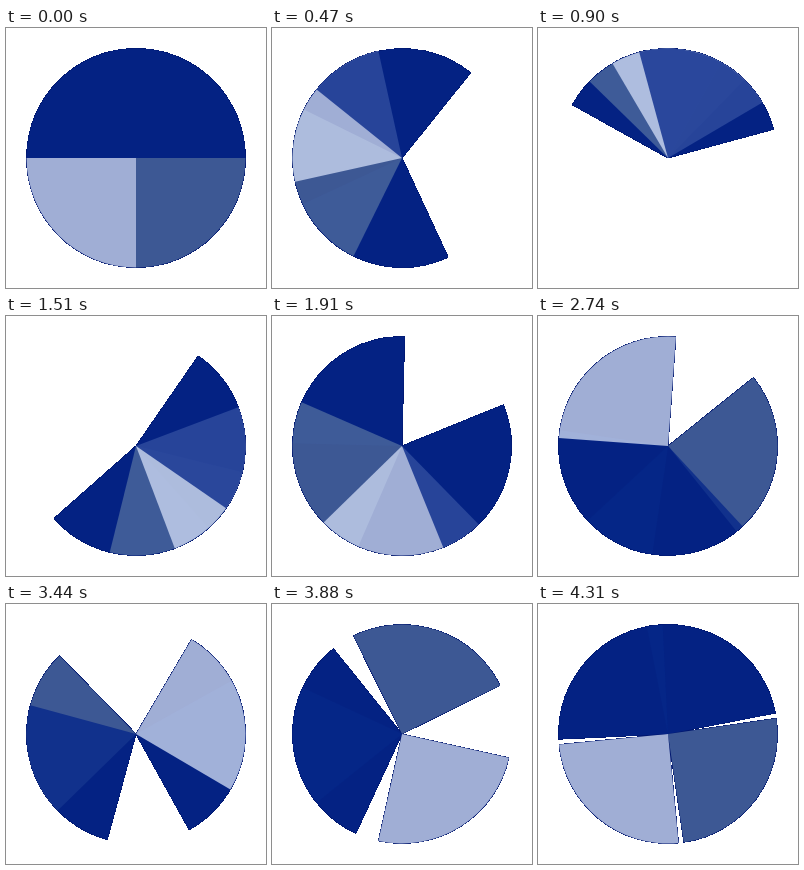
Animation, 260 px wide and 260 px high, one loop 4.35 s. Source, as an HTML page with a canvas:

```html
<!DOCTYPE html>
<html lang="en">
<head>
<meta charset="utf-8">
<title>Turning quarters</title>
<style>
  html, body { margin: 0; width: 100%; height: 100%; overflow: hidden; background: #fff; }
  canvas { display: block; }
</style>
</head>
<body>
<canvas id="stage" width="260" height="260"></canvas>
<script>
const SIZE = 260, CENTER = 130, RADIUS = 109.5;
const LOOP = 4350, STEPS = 130, STEP_MS = 33.445;
const OPACITY = 0.78;
const MATTE = [0, 22, 110];
const NAVY = [6, 39, 138], SLATE = [79, 107, 159], PALE = [206, 217, 243];

// Bottom to top: start in quarter turns, whole turns per loop.
const sectors = [
  { color: NAVY, start: 3, turns: 4 },
  { color: SLATE, start: 0, turns: 3 },
  { color: PALE, start: 1, turns: 2 },
  { color: NAVY, start: 2, turns: 1 }
];

const ctx = document.getElementById('stage')
  .getContext('2d', { willReadFrequently: true });

function drawSector({ color, start, turns }, phase) {
  const angle = (start / 4 + turns * phase) % 1 * 2 * Math.PI;
  ctx.fillStyle = `rgba(${color}, ${OPACITY})`;
  ctx.beginPath();
  ctx.moveTo(CENTER, CENTER);
  ctx.arc(CENTER, CENTER, RADIUS, angle, angle + Math.PI / 2);
  ctx.fill();
}

// Blend every touched pixel onto the dark matte and leave the rest white.
function flatten() {
  const image = ctx.getImageData(0, 0, SIZE, SIZE);
  const px = image.data;
  for (let i = 0; i < px.length; i += 4) {
    const alpha = px[i + 3];
    for (let c = 0; c < 3; c++) {
      px[i + c] = alpha === 0
        ? 255
        : MATTE[c] + (px[i + c] - MATTE[c]) * alpha / 255;
    }
    px[i + 3] = 255;
  }
  ctx.putImageData(image, 0, 0);
}

function render(step) {
  ctx.clearRect(0, 0, SIZE, SIZE);
  for (const sector of sectors) drawSector(sector, step / STEPS);
  flatten();
}

// Steps begin on multiples of 10 ms.
function stepAt(time) {
  const tick = Math.floor(time / 10) * 10 + 5;
  return Math.min(STEPS - 1, Math.floor(tick / STEP_MS));
}

const origin = performance.now();
let shown = 0;
render(shown);

function frame() {
  const step = stepAt((performance.now() - origin) % LOOP);
  if (step !== shown) render(shown = step);
  requestAnimationFrame(frame);
}
requestAnimationFrame(frame);
</script>
</body>
</html>
```
